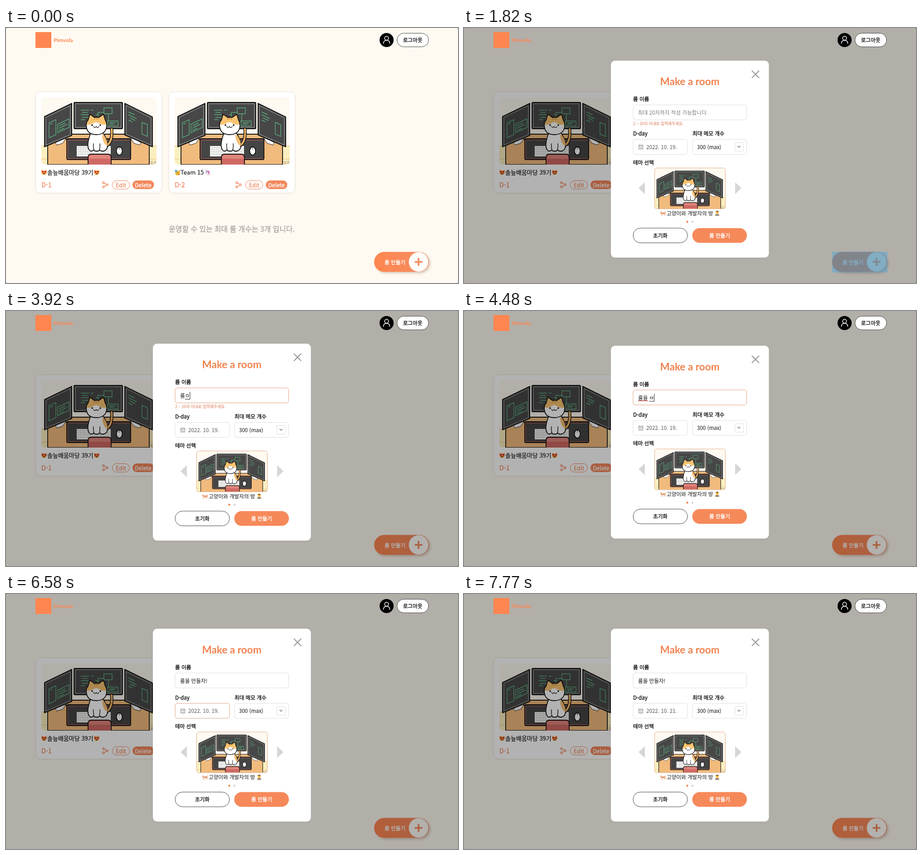
These frames come from a looping animation (997x562 px, 8 s). An HTML page:

```html
<!DOCTYPE html>
<html lang="ko">
<head>
<meta charset="utf-8">
<title>Make a room</title>
<style>
  html, body { margin: 0; width: 100%; height: 100%; overflow: hidden; background: #777; }
  svg { display: block; }
  #stage { width: 100vw; height: 100vh; }
  text { font: 400 11.6px "Noto Sans CJK KR", "Noto Sans CJK", "Noto Sans CJK JP", sans-serif; fill: #111; }
  .medium { stroke: #111; stroke-width: .35; }
  .middle { text-anchor: middle; }
  .white { fill: #fff; }
  .white.medium { stroke: #fff; }
  .orange { fill: #ee8559; }
  .orange.medium { stroke: #ee8559; stroke-width: .25; }
  .name { font-size: 13px; stroke: #111; stroke-width: .15; }
  .brand { font: 700 12px Lato, sans-serif; fill: #ff8650; }
  .title { font: 700 22.5px Lato, sans-serif; fill: #f0834f; }
  .notice { font-size: 15.85px; fill: #a8a49f; stroke: #a8a49f; stroke-width: .3; }
  .hint { font-size: 8.7px; fill: #d9734f; }
  .field { fill: #fff; stroke: #dedede; }
  .ink { stroke: #111; stroke-width: 1.8; stroke-linejoin: round; stroke-linecap: round; }
  .code { fill: none; stroke: #5cab7c; stroke-width: 1.4; }
  .line { fill: none; stroke-linecap: round; stroke-linejoin: round; }
</style>
</head>
<body>
<svg id="stage" viewBox="0 0 997 562">
  <defs>
    <filter id="soft" x="-20%" y="-20%" width="150%" height="160%">
      <feDropShadow dx="0" dy="1.500" stdDeviation="2" flood-opacity=".05"/>
    </filter>
    <filter id="drop" x="-20%" y="-20%" width="150%" height="160%">
      <feDropShadow dx="3" dy="3" stdDeviation="2.500" flood-color="#60391f" flood-opacity=".25"/>
    </filter>
    <linearGradient id="peach">
      <stop stop-color="#ff8650"/><stop offset="1" stop-color="#f48d61"/>
    </linearGradient>
    <clipPath id="head"><path d="M177 213Q177 207 181 203L185 190L195 197Q200 196 205 197L215 190L219 203Q223 209 222 217Q220 235 199 235Q177 235 177 213Z"/></clipPath>

    <symbol id="room" viewBox="78 153 254 148" preserveAspectRatio="xMidYMid slice">
      <path fill="#fffaf1" d="M78 153h254v148H78z"/>
      <path fill="#fbefc0" d="M78 259h254v42H78z"/>
      <path d="M78 260h254M78 289h254" stroke="#eebd77"/>
      <path fill="#d9c7a5" d="M319 293h5v8h-5zM326 293h5v8h-5z"/>
      <!-- desk -->
      <path class="ink" fill="#f1bb7d" d="M128 234H282L286 245H122Z"/>
      <path class="ink" fill="#f1bb7d" d="M92 301V245H316V301Z"/>
      <path fill="#fbfbfb" stroke="#222" d="M109 253l13-8 11-3-8 12-13 4zM298 253l-13-8-11-3 8 12 13 4z"/>
      <!-- monitors -->
      <g class="ink" fill="#474747">
        <path d="M85 195L145 166V237L85 262Z"/>
        <path d="M262 166L323 196V262L262 236Z"/>
        <rect x="150" y="164" width="107" height="58" rx="2"/>
      </g>
      <path fill="none" stroke="#c9c9c9" stroke-width=".8" d="M88 197L142 171V235L88 258ZM265 171L320 198V258L265 234ZM153 167H254V219H153Z"/>
      <g class="code">
        <path d="M95 209L110 202V235L95 242ZM114 212L139 200V219L114 231ZM117 216l14-7M117 221l18-9M117 226l11-5M98 212l5-2"/>
        <path d="M270 185l13 6M270 191l18 9M273 198l12 6M270 203l9 4M300 208L312 213V239L300 234Z"/>
        <path d="M165 181h18M187 181h6M168 186h12M165 191h17M168 197h15M165 202h9M216 176h18v13H216ZM203 201v-15h13M226 189v15M204 191h-6M224 205h23v11H224ZM228 209h14M228 212h10"/>
      </g>
      <!-- mat, keyboard, mouse -->
      <rect class="ink" x="134" y="244" width="141" height="46" rx="3" fill="#454545"/>
      <path class="line" stroke="#cf6257" d="M272 247H138Q136 247 136 250V288H272"/>
      <rect x="156" y="260" width="75" height="23" fill="#f5f5f2"/>
      <path d="M158 264h71M158 268.500h71M158 273h71M158 278h71" stroke="#c4c4c4" stroke-width="1.600" stroke-dasharray="4 1"/>
      <ellipse class="ink" cx="250" cy="271" rx="6.500" ry="9" fill="#fff"/>
      <path d="M250 263v5" stroke="#333"/>
      <!-- cat -->
      <path class="line" stroke="#111" stroke-width="7" d="M219 262Q236 252 233 223"/>
      <path class="line" stroke="#f5b766" stroke-width="4" d="M219 262Q236 252 233 223"/>
      <path d="M231 232l4 1M231 240l4 1" stroke="#a8682c"/>
      <path class="ink" fill="#fff" d="M187 231C182 244 178 260 183 268Q187 274 193 269Q200 274 207 269Q213 274 220 269C228 262 222 243 214 231Z"/>
      <path fill="#f6bf72" d="M214 234Q225 247 224 260Q214 256 212 237Z"/>
      <path class="line" stroke="#111" stroke-width="1.400" d="M194 269Q192 260 193 255M206 269Q208 260 207 255"/>
      <g clip-path="url(#head)">
        <path fill="#fff" d="M170 185h60v55h-60z"/>
        <path fill="#f8c472" d="M170 185h60v27Q214 215 207 211Q199 204 191 211Q184 215 170 212Z"/>
        <path d="M195 196v6M199 195v7M203 196v6" stroke="#c68036" stroke-width="1.400"/>
      </g>
      <path class="ink" fill="none" d="M177 213Q177 207 181 203L185 190L195 197Q200 196 205 197L215 190L219 203Q223 209 222 217Q220 235 199 235Q177 235 177 213Z"/>
      <circle cx="190" cy="214" r="1.700"/><circle cx="208" cy="214" r="1.700"/>
      <path class="line" stroke="#111" stroke-width="1.400" d="M193 217Q196 222 199 217Q202 222 205 217"/>
      <!-- chair -->
      <path class="ink" fill="#cf6963" d="M181 302V285Q181 278 188 278H225Q232 278 232 285V302Z"/>
      <path fill="#df857d" d="M183 288V285Q183 280 188 280H225Q230 280 230 285V288Z"/>
    </symbol>

    <!-- emoji, 14 x 14 -->
    <symbol id="loveCat" viewBox="0 0 14 14">
      <path fill="#f2a73b" d="M1 1l4 2h4l4-2v7Q12 13 7 13Q2 13 1 8Z"/>
      <path fill="#d8303d" d="M4 9Q0 5 2 4Q3 3.500 4 5Q5 3.500 6 4Q8 5 4 9ZM10 9Q6 5 8 4Q9 3.500 10 5Q11 3.500 12 4Q14 5 10 9Z"/>
      <path fill="#6b2d18" d="M4.500 9.500h5Q9 12 7 12T4.500 9.500Z"/>
    </symbol>
    <symbol id="party" viewBox="0 0 14 14">
      <circle cx="7.500" cy="8" r="5.500" fill="#f8c93e"/>
      <path fill="#4d9bd6" d="M1 1l7 2-5 4z"/>
      <path fill="#e3573f" d="M9 10l4 1-3 2zM11 2h2v2h-2z"/>
      <path class="line" stroke="#6d4315" d="M5 7q1-1 2 0M9 7q1-1 2 0M6 10h3"/>
    </symbol>
    <symbol id="unicorn" viewBox="0 0 14 14">
      <path fill="#e6dcec" d="M2 8l5-5 5 3 1 7H7L6 9 3 10z"/>
      <path fill="#c56aae" d="M7 3q5-1 6 3v7l-3-6z"/>
      <path fill="#8f7fd0" d="M4 1l3 2-2 2z"/>
      <circle cx="6.500" cy="6" r=".8"/>
    </symbol>
    <symbol id="kitty" viewBox="0 0 14 14">
      <path fill="#efb08b" d="M1 4l2-2 3 3h5l2-3 1 1-1 9h-2V9H6v4H4V9L1 7z"/>
      <path d="M8 5v3M10 5v3" stroke="#b96e4c"/>
    </symbol>
    <symbol id="coder" viewBox="0 0 14 14">
      <circle cx="7" cy="4.500" r="3.500" fill="#f3bd45"/>
      <path fill="#704b2c" d="M3.500 4Q4 0 7 1Q10 0 10.500 4Q7 2 3.500 4Z"/>
      <path fill="#e3a740" d="M2 13Q2 8 7 8T12 13Z"/>
      <path fill="#8b8b8b" d="M3 9h8v4H3z"/>
    </symbol>

    <g id="card">
      <rect x="65.500" y="140.500" width="278" height="223" rx="11" fill="#fff" stroke="#ebe6df" filter="url(#soft)"/>
      <svg x="78" y="153" width="254" height="148"><use href="#room"/></svg>
      <path d="M78 161v-8h8q-8 0-8 8M332 161v-8h-8q8 0 8 8M78 293v8h8q-8 0-8-8M332 293v8h-8q8 0 8-8" fill="#fff"/>
      <path class="line" stroke="#ee8559" stroke-width="1.300" d="M217 342l4 2M217 349l4-2"/>
      <g fill="#fff" stroke="#ee8559" stroke-width="1.300"><circle cx="215" cy="341" r="2"/><circle cx="215" cy="350" r="2"/><circle cx="223" cy="345.500" r="2"/></g>
      <rect x="234.500" y="336.500" width="38" height="18.500" rx="9" fill="#fff" stroke="#ee8559"/>
      <text class="middle medium orange" x="253.500" y="350.500" style="font-size:12.500px">Edit</text>
      <rect x="279" y="336" width="47.500" height="19" rx="9.500" fill="#f3875b"/>
      <text class="middle medium white" x="302.500" y="350.500" style="font-size:12.300px">Delete</text>
    </g>
  </defs>

  <rect width="997" height="562" rx="3" fill="#fffaf1"/>
  <use href="#card"/>
  <use href="#loveCat" x="77.500" y="311.500" width="13" height="13"/>
  <text class="name" x="91" y="323">솔늪배움마당 39기</text>
  <use href="#loveCat" x="193.500" y="311.500" width="13" height="13"/>
  <text class="medium orange" x="78" y="350.500" style="font-size:14.300px">D-1</text>
  <use href="#card" x="294"/>
  <use href="#party" x="371" y="311.500" width="14" height="14"/>
  <text class="name" x="385" y="323">Team 15</text>
  <use href="#unicorn" x="436" y="311.500" width="14" height="14"/>
  <text class="medium orange" x="372" y="350.500" style="font-size:14.300px">D-2</text>
  <text class="notice middle" x="498" y="448.500">운영할 수 있는 최대 룸 개수는 3개 입니다.</text>

  <rect x="812" y="493.500" width="121" height="44" rx="22" fill="url(#peach)" filter="url(#drop)"/>
  <text class="medium white" x="835" y="520.500">룸 만들기</text>
  <circle cx="910" cy="515.500" r="21.500" fill="#fffdf9"/>
  <path d="M901.500 515.500h17M910 507v17" stroke="#f6895a" stroke-width="3.600"/>

  <g id="overlay">
    <rect width="997" height="562" rx="3" fill-opacity=".3"/>
    <rect id="flash" x="812" y="493" width="122" height="46" fill="#55aada"/>
  </g>

  <rect x="65" y="9" width="35" height="35" fill="#ff8650"/>
  <text class="brand" x="105" y="31">Pimvola</text>
  <circle cx="839.500" cy="26.500" r="15.500"/>
  <g class="line" stroke="#fff" stroke-width="1.500"><circle cx="839.500" cy="22.500" r="4.300"/><path d="M832.500 34Q833 27 839.500 27T846.500 34"/></g>
  <rect x="862.500" y="11.500" width="69.500" height="30" rx="15" fill="#fff" stroke="#444"/>
  <text class="middle medium" x="897" y="31">로그아웃</text>

  <g id="modal">
    <rect id="panel" x="324" width="348.500" rx="9" fill="#fff" filter="url(#soft)"/>
    <g id="upper">
      <path d="M635 94l16 16M651 94l-16 16" stroke="#999" stroke-width="2.200"/>
      <text class="title middle" x="498" y="126">Make a room</text>
      <text class="medium" x="373" y="161">룸 이름</text>
      <rect id="nameBox" class="field" x="373" y="169.500" width="250.500" height="33" rx="5"/>
      <text id="typed" x="384" y="191"></text>
      <path id="compose" stroke="#222"/>
      <path id="spell" d="M384.500 193.500h20.500" stroke="#c4463b" stroke-width="2" stroke-dasharray="2 1.200"/>
      <path id="caret" stroke="#222"/>
    </g>
    <g id="lower">
      <text id="hint" class="hint" x="373" y="213.500">2 ~ 20자 이내로 입력해주세요.</text>
      <text class="medium" x="373" y="237">D-day</text>
      <text class="medium" x="504" y="237">최대 메모 개수</text>
      <rect id="dateBox" class="field" x="373" y="245.500" width="120" height="33" rx="5"/>
      <path fill="none" stroke="#888" d="M385.500 258.500h9v8.500h-9zM385.500 261h9M387.500 256.500v2M392.500 256.500v2M387 264.500h6"/>
      <text id="date" x="402" y="266.500" style="fill:#555"></text>
      <rect class="field" x="504" y="245.500" width="119.500" height="33" rx="5"/>
      <text x="514" y="266.500">300 (max)</text>
      <rect x="597.500" y="252.500" width="19" height="19" rx="2" fill="#fff" stroke="#ddd"/>
      <path fill="#aaa" d="M602 260h9l-4.500 4.500z"/>
      <text class="medium" x="373" y="300.500">테마 선택</text>
      <svg x="421" y="309" width="155" height="89"><use href="#room"/></svg>
      <rect x="420.500" y="308.500" width="156" height="90" rx="5" fill="none" stroke="#e3ae8b"/>
      <path fill="#d6d6d6" d="M385 353l14-13v26zM612 353l-14-13v26z"/>
      <use href="#kitty" x="432" y="402" width="13" height="13"/>
      <text x="447" y="412.500">고양이와 개발자의 방</text>
      <use href="#coder" x="552" y="402" width="13" height="13"/>
      <circle cx="492.500" cy="427" r="2.300" fill="#f6895a"/>
      <circle cx="504" cy="427" r="2.300" fill="#d4d4d4"/>
      <rect x="373" y="441" width="120" height="32.500" rx="16.250" fill="#fff" stroke="#444"/>
      <text class="middle medium" x="433" y="461.500">초기화</text>
      <rect x="503.500" y="441" width="120.500" height="32.500" rx="16.250" fill="#f6895a"/>
      <text class="middle medium white" x="564" y="461.500">룸 만들기</text>
    </g>
    <g id="calendar">
      <rect x="373.500" y="281.500" width="176.500" height="195" rx="3" fill="#fff" stroke="#e79a75"/>
      <path fill="#ff8652" d="M424 282l6.500-6.500 6.500 6.500H547q3 0 3 3V323.500H373.500V285q0-3 3-3z"/>
      <text class="middle white" x="461.500" y="298" style="font-weight:700">October 2022</text>
      <path class="line" stroke="#fff" stroke-width="2.200" d="M534 288.500l5 5-5 5"/>
      <rect x="451.500" y="402" width="20" height="20" rx="3" fill="#ff8652"/>
    </g>
  </g>
</svg>
<script>
const LOOP = 8000;
const ui = Object.fromEntries([...document.querySelectorAll('#stage [id]')].map(el => [el.id, el]));
const PLACEHOLDER = '최대 20자까지 작성 가능합니다.';
const KEYS = [
  [3570, 'ㄹ'], [3640, '루'], [3780, '룸'], [3920, '룸ㅇ'], [3990, '룸으'], [4130, '룸을'], [4270, '룸을 '],
  [4480, '룸을 ㅁ'], [4550, '룸을 마'], [4760, '룸을 만'], [4830, '룸을 만ㄷ'], [4900, '룸을 만드'],
  [5180, '룸을 만들ㅈ'], [5320, '룸을 만들자'], [5670, '룸을 만들자!']
];

function addLabel(text, x, y, color) {
  const label = document.createElementNS('http://www.w3.org/2000/svg', 'text');
  label.setAttribute('class', 'middle');
  label.setAttribute('x', x);
  label.setAttribute('y', y);
  label.style.fill = color;
  label.textContent = text;
  ui.calendar.append(label);
}

['Su', 'Mo', 'Tu', 'We', 'Th', 'Fr', 'Sa'].forEach((day, i) => addLabel(day, 390 + 23.9 * i, 316, '#fff'));
for (let i = 0; i < 42; i++) {
  const day = new Date(2022, 8, 25 + i).getDate();
  const color = i < 24 ? '#ccc' : i === 24 ? '#fff' : '#111';
  addLabel(day, 390 + 23.9 * (i % 7), 345.3 + 23.85 * Math.floor(i / 7), color);
}

const show = (el, on) => el.style.display = on ? '' : 'none';
const border = (el, on) => el.style.stroke = on ? '#dfa27f' : '#dedede';

function widthOf(text) {
  ui.typed.textContent = text.replaceAll(' ', '\u00a0');
  return text ? ui.typed.getComputedTextLength() : 0;
}

function drawName(t) {
  const text = KEYS.filter(([time]) => t >= time).pop()?.[1] ?? '';
  const focused = t >= 2870 && t < 6580;
  const composing = focused && /[ㄱ-힣]$/.test(text);
  const start = 384 + widthOf(text.slice(0, -1));
  const end = 384 + widthOf(text);
  if (!text) ui.typed.textContent = PLACEHOLDER;
  ui.typed.style.fill = text ? '#111' : '#7a7a7a';
  ui.compose.setAttribute('d', `M${start} 194.500H${end}`);
  ui.caret.setAttribute('d', `M${end + .5} 178v17`);
  show(ui.compose, composing);
  show(ui.caret, focused);
  show(ui.spell, focused && t >= 4270);
  border(ui.nameBox, focused);
}

function draw(t) {
  const open = t >= 1820;
  show(ui.overlay, open);
  show(ui.modal, open);
  if (!open) return;

  ui.flash.style.opacity = t < 1890 ? .5 : t < 1960 ? .25 : 0;

  // The panel closes up once the name is valid.
  const valid = t >= 3990;
  const shift = valid ? 4.5 : 0;
  ui.panel.setAttribute('y', 72 + shift);
  ui.panel.setAttribute('height', 434 - 2 * shift);
  ui.upper.setAttribute('transform', `translate(0 ${shift})`);
  ui.lower.setAttribute('transform', `translate(0 ${-shift})`);
  show(ui.hint, !valid);

  drawName(t);
  border(ui.dateBox, t >= 6580 && t < 7770);
  show(ui.calendar, t >= 6650 && t < 7700);
  ui.date.textContent = `2022. 10. ${t < 7700 ? 19 : 21}.`;
}

function tick() {
  draw(performance.now() % LOOP);
  requestAnimationFrame(tick);
}
tick();
</script>
</body>
</html>
```
